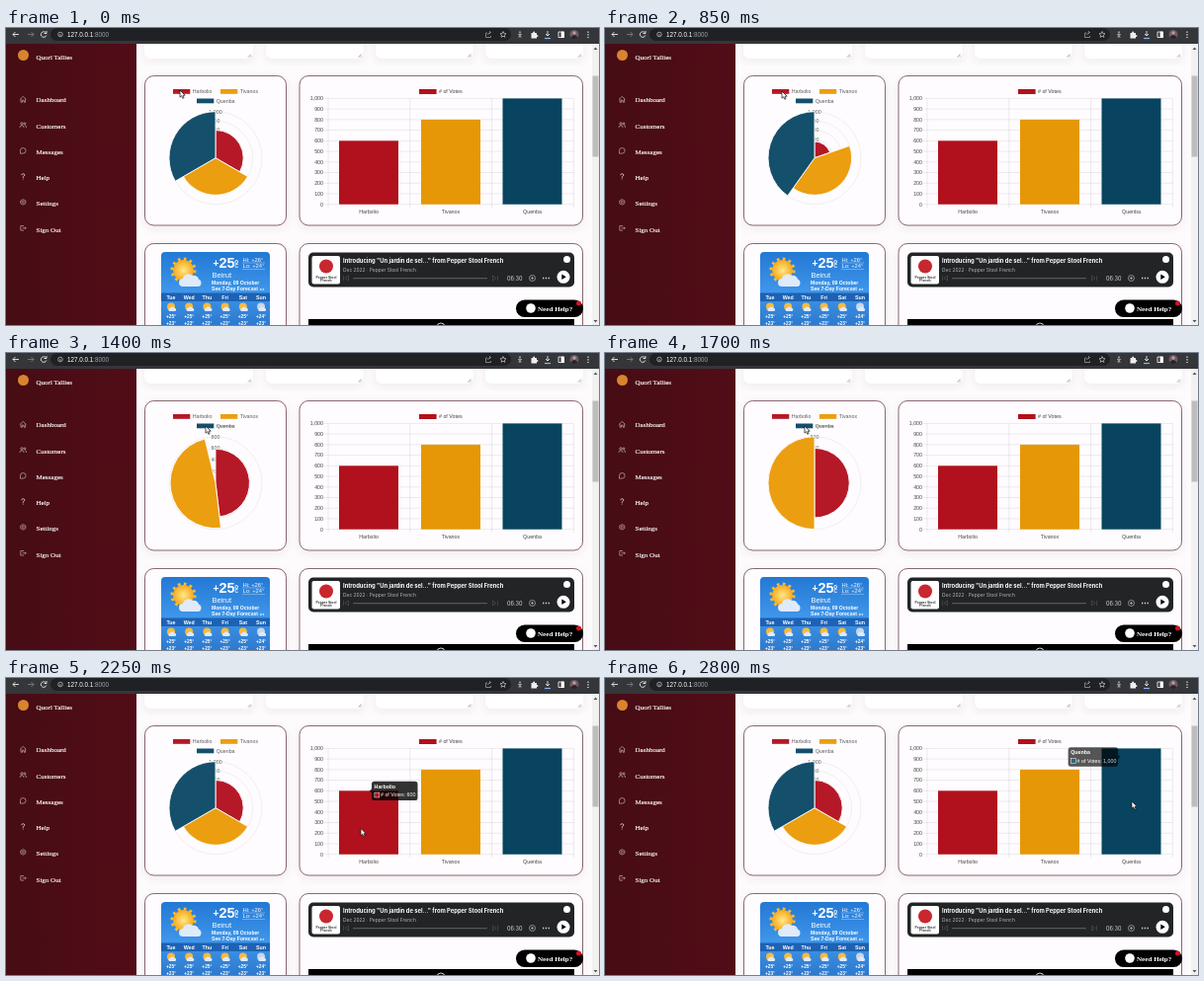
These frames come from a looping animation (600 by 301 pixels, 2.85 s). An HTML page:

```html
<!DOCTYPE html>
<html lang="en">
<head>
<meta charset="utf-8">
<title>Dashboard</title>
<style>
  html, body { margin: 0; width: 100%; height: 100%; overflow: hidden; background: #fdfbfc; }
  svg { display: block; width: 600px; height: 301px; font: 5.3px "Liberation Sans", Arial, sans-serif; }
  .serif { font-family: "Liberation Serif", "Times New Roman", serif; }
  .inter { font-family: Inter, sans-serif; }
  .label { fill: #5c5c5c; }
  #bars .label { fill: #444; }
  .mid { text-anchor: middle; }
  .end { text-anchor: end; }
  .bold { font-weight: 700; }
  .line { fill: none; stroke: #fff; stroke-width: .8; }
  .thin { stroke: #e6d8da; stroke-width: .55; }
  .dim { stroke: #5c5e60; }
  .card { fill: #fefcfe; stroke: #5a2a34; stroke-width: .7; filter: url(#shadow); }
</style>
</head>
<body>
<svg viewBox="0 0 600 301">
  <defs>
    <linearGradient id="side"><stop stop-color="#460c14"/><stop offset="1" stop-color="#520d17"/></linearGradient>
    <linearGradient id="sky" x2="0" y2="1"><stop stop-color="#2378d4"/><stop offset=".5" stop-color="#3f96ea"/><stop offset="1" stop-color="#2a74c8"/></linearGradient>
    <radialGradient id="sun"><stop stop-color="#ffe98a"/><stop offset="1" stop-color="#f7a81b"/></radialGradient>
    <filter id="shadow" x="-10%" y="-10%" width="120%" height="130%"><feDropShadow dx="0" dy="3" stdDeviation="4" flood-color="#604050" flood-opacity=".08"/></filter>
    <clipPath id="weatherClip"><rect x="157" y="227" width="110" height="90" rx="4"/></clipPath>
  </defs>
  <rect width="600" height="301" fill="#fdfbfc"/>
  <g id="cards"></g>

  <!-- browser bar -->
  <rect width="600" height="16" fill="#35363a"/>
  <rect x="45" y="0" width="466" height="13" rx="6.5" fill="#202124"/>
  <g class="line">
    <path d="M13 6.500H7m2.500-2.500L7 6.500 9.500 9"/>
    <path d="M22 6.500h6m-2.500-2.500L28 6.500 25.500 9" stroke="#85868a"/>
    <path d="M40.500 5a2.800 2.800 0 1 0 .3 2.500M41 3v2.500h-2.500"/>
    <circle cx="55" cy="6.500" r="2.300" stroke="#bbb"/><path d="M55 6v2" stroke="#bbb"/>
    <path d="M487 5h-1.500v4.500h5V8M487.500 7q.5-2.500 3-2.500m-1.500-1.500 1.500 1.500L489 6" stroke="#999"/>
    <path d="m503 3.500.9 2 2.100.2-1.600 1.500.5 2.100-1.900-1.100-1.900 1.100.5-2.100L500 5.700l2.100-.2z" stroke="#bbb"/>
    <path d="M548 3v5m-2-2 2 2 2-2"/><path d="M545 10.500h6" stroke="#8ab4f8" stroke-width="1.200"/>
    <path d="M559 4h5.500v5.500H559z"/><path d="M562 4h2.500v5.500H562z" fill="#fff"/>
  </g>
  <path d="M518.300 9.500h3.400l-.9-2.500h1.200V6h-4v1h1.200zM518.800 3.500h2.400l-.4 2h-1.600z" fill="#999"/>
  <path d="M531.500 5h1.600q0-2 1.600-1.500.8.5.3 1.500h2v2q1.500 0 1.500 1t-1.500 1v1.500h-5.500z" fill="#eee"/>
  <circle cx="575" cy="6.500" r="4.500" fill="#6d5c66"/><path d="M571.500 9.500q3.500-5 7 0-3.500 3-7 0" fill="#28232b"/><circle cx="575" cy="5" r="1.700" fill="#c39a91"/>
  <path d="M589 3.500v7" stroke="#fff" stroke-width="1.200" stroke-dasharray="1.200 1.500"/>
  <text x="62" y="8.800" fill="#fff" font-size="6.300">127.0.0.1<tspan fill="#9aa0a6">:8000</tspan></text>

  <!-- sidebar -->
  <rect y="16" width="132" height="285" fill="url(#side)"/>
  <circle cx="17.500" cy="27.500" r="5.500" fill="#d8842f"/>
  <g id="menu" class="serif" font-size="7" fill="#fff" stroke="#fff" stroke-width=".15"><text x="30.500" y="31.500">Quorl Tallies</text></g>
  <g class="line thin" transform="translate(0 -.8)">
    <path d="M14.300 73l3-2.800 3 2.800M15 72.500V76h1.500v-2h1.600v2h1.500v-3.500"/>
    <circle cx="16" cy="97.700" r="1.200"/><circle cx="19" cy="97.700" r="1"/><path d="M13.900 101.700q.3-2.200 2.100-2.200t2.100 2.200M19 99.500q1.600.2 1.700 2.200"/>
    <path d="M14.500 128v-3a2.800 2.800 0 1 1 2.800 2.900z"/>
    <path d="M15.800 150q0-1.500 1.500-1.500t1.500 1.400q0 1-1.500 1.700v1.100m0 .8v.8" stroke-width=".8"/>
    <path d="M17.300 174.500l2.500 1.300v2.800l-2.500 1.300-2.500-1.300v-2.800z"/><circle cx="17.300" cy="177.200" r="1"/>
    <path d="M18 201.300h-3.200v4.600H18m-1.500-2.300h3.700m-1.200-1.300 1.300 1.300-1.300 1.300"/>
  </g>

  <!-- scrollbar -->
  <rect x="593" y="16" width="7" height="285" fill="#f1f1f1"/>
  <rect x="593.500" y="48.500" width="6" height="82" fill="#bdbdbd"/>
  <path d="M594.500 22l2-2.500 2 2.500z" fill="#555"/><path d="M594.500 296l2 2.500 2-2.500z" fill="#555"/>

  <g id="bars"></g>

  <!-- weather -->
  <g clip-path="url(#weatherClip)" fill="#fff">
    <rect x="157" y="227" width="110" height="80" fill="url(#sky)"/>
    <rect x="157" y="268.500" width="110" height="8.500" fill="#1d62b4"/>
    <circle cx="179.500" cy="245.500" r="11" fill="none" stroke="#f9bd35" stroke-width="4" stroke-dasharray="2.500 3.260"/>
    <circle cx="179.500" cy="245.500" r="10.500" fill="url(#sun)"/>
    <path d="M179 262a4 4 0 0 1 0-8 6 6 0 0 1 10-3 5 5 0 0 1 6 3.500 4 4 0 0 1 0 7.500z" fill="#dfeafa"/>
    <g class="bold"><text x="209.500" y="242" font-size="10">+</text><text x="215.500" y="243" font-size="14.500">25</text>
    <text x="231" y="243" font-size="11">°</text><text x="231.500" y="243.300" font-size="5">C</text></g>
    <text x="239.500" y="236.500" font-size="5.800">Hi: +26°</text><text x="239.500" y="243.300" font-size="5.800">Lo: +24°</text>
    <path d="M239 238h23m-23 6.500h23" stroke="#cfe4fa" stroke-width=".4"/>
    <text x="208.500" y="253" font-size="7.500">Beirut</text>
    <g class="bold" font-size="5.100"><text x="208" y="260">Monday, 09 October</text>
    <text x="208" y="265.700">See 7-Day Forecast ›››</text></g>
    <g id="days"></g>
  </g>

  <!-- podcast player -->
  <rect x="306" y="227.500" width="269" height="35" rx="5" fill="#222426"/>
  <rect x="309.500" y="231" width="28.500" height="28.500" rx="2" fill="#fff"/>
  <circle cx="324" cy="241.500" r="7" fill="#c8272f"/>
  <g class="mid bold" font-size="3.400" fill="#333"><text x="324" y="253.500">Pepper Stool</text><text x="324" y="257">French</text></g>
  <g class="inter" fill="#fff">
    <text class="bold" x="341" y="238" font-size="5.800">Introducing "Un jardin de sel..." from Pepper Stool French</text>
    <text x="341" y="246.500" font-size="4.900" fill="#b8b8b9">Dec 2022 · Pepper Stool French</text>
    <text x="507" y="255.700" font-size="5.600" fill="#d5d6d7">06:30</text>
  </g>
  <rect x="351" y="253" width="136" height="1.300" rx=".6" fill="#55575a"/>
  <g class="line dim"><path d="M341.500 251v5m5-5-3.500 2.500 3.500 2.500zM497.500 251v5m-5-5 3.500 2.500-3.500 2.500z" stroke-width=".5"/>
  <circle cx="532.500" cy="253.500" r="3" stroke="#aaa"/><path d="M531 253.500h3m-1.500-1.500v3" stroke="#aaa"/></g>
  <path d="M543 253.500h7" stroke="#ddd" stroke-width="1.300" stroke-dasharray="1.300 1.500"/>
  <circle cx="567.500" cy="234.500" r="3.500" fill="#fff"/>
  <circle cx="564" cy="252.300" r="6.500" fill="#fff"/><path d="M562.300 249.500v5.600l4.500-2.800z"/>
  <rect x="306" y="295" width="269" height="6"/>
  <circle cx="440" cy="303" r="4" class="line"/>

  <!-- help button -->
  <rect x="516" y="275.500" width="68" height="17.500" rx="8.750"/>
  <circle cx="531" cy="284" r="4.800" fill="#fff"/>
  <text class="serif bold" x="538" y="286.700" font-size="7.100" fill="#fff">Need Help?</text>
  <circle cx="579.500" cy="279" r="2.500" fill="#d5141f"/>

  <g id="live"></g>
  <g id="tip"></g>
  <path id="cursor" d="M0 0v7.200l1.700-1.500 1.100 2.600 1.300-.6-1.100-2.500h2.200z" fill="#fff" stroke="#111" stroke-width=".7"/>
</svg>
<script>
const $ = id => document.getElementById(id);
const rect = (x, y, w, h, extra) => `<rect x="${x}" y="${y}" width="${w}" height="${h}" ${extra}/>`;
const text = (x, y, s, extra = 'class="label"') => `<text x="${x}" y="${y}" ${extra}>${s}</text>`;
const clamp = x => Math.min(1, Math.max(0, x));
const mix = (a, b, p) => a + (b - a) * p;
const easeOut = x => 1 - (1 - clamp(x)) ** 4;

const names = ['Harbolio', 'Tivanox', 'Quenba'];
const votes = [600, 800, 1000];
const barColors = ['#b1111c', '#e59706', '#08445f'];
const pieColors = ['#b51827', '#eb9e10', '#144f6b'];
const barX = [367, 450, 532.5], floor = 178.7;
const barY = v => floor - v * .1073;
const comma = n => n.toLocaleString('en-US');

function drawStatic() {
  $('cards').innerHTML =
    [[140, 110], [263, 98.5], [374, 98.5], [485, 99]].map(([x, w]) =>
      rect(x, 0, w, 31, 'rx="7" fill="#fff" filter="url(#shadow)"') +
      `<path d="M${x + w - 5} 29.500l3-3m-1.300 3 1.300-1.300" stroke="#777" stroke-width=".6"/>`).join('') +
    [48.5, 218.5].map(y => [[140.5, 143], [297, 286.5]].map(([x, w]) =>
      rect(x, y, w, 151.5, 'rx="9" class="card"')).join('')).join('');

  $('menu').innerHTML += ['Dashboard', 'Customers', 'Messages', 'Help', 'Settings', 'Sign Out']
    .map((s, i) => text(30.5, 75.2 + i * 26.3, s, '')).join('');

  let s = '', grid = '';
  for (let v = 0; v <= 1000; v += 100) {
    grid += `M321.500 ${barY(v)}H574.500`;
    s += text(321, barY(v) + 1.9, comma(v), 'class="label end"');
  }
  for (let i = 0; i < 4; i++) grid += `M${326 + i * 82.8} 71.400V182`;
  s += `<path d="${grid}" stroke="#000" stroke-opacity=".13" stroke-width=".6"/>`;
  votes.forEach((v, i) => {
    s += rect(barX[i] - 30, barY(v), 60, floor - barY(v), `fill="${barColors[i]}"`) +
      text(barX[i], 188.3, names[i], 'class="label mid"');
  });
  $('bars').innerHTML = s + rect(418, 62, 17.6, 5, `fill="${barColors[0]}"`) + text(438, 66.2, '# of Votes');

  $('days').innerHTML = ['Tue', 'Wed', 'Thu', 'Fri', 'Sat', 'Sun'].map((d, i) => {
    const x = 167 + i * 18.2, mid = 'class="mid bold"';
    return text(x, 274.7, d, mid) + `<circle cx="${x}" cy="282.500" r="4" fill="${i < 5 ? '#f9b93c' : '#c8d6e6'}"/>` +
      `<path d="M${x - 1} 287a1.600 1.600 0 0 1 0-3.200 2.500 2.500 0 0 1 4.500 0 1.600 1.600 0 0 1 0 3.200z" fill="#dfeafa"/>` +
      text(x, 294.3, i < 5 ? '+25°' : '+24°', mid + ' font-size="4.800"') + text(x, 300.7, '+23°', mid + ' font-size="4.800"');
  }).join('');
}

// Times at which a slice is switched off and on again.
const redOff = 150, redOn = 750, blueOff = 1190, blueOn = 1727;
const hidden = (t, off, on) => t < on ? easeOut((t - off) / 500) : 1 - easeOut((t - on) / 500);

function drawPie(t) {
  const cx = 212, cy = 131.7, R = 47;
  const off = [t >= redOff && t < redOn, false, t >= blueOff && t < blueOn];
  const u = hidden(t, redOff, redOn), v = hidden(t, blueOff, blueOn);
  const scale = R / 1000 * (1 + v / 4);
  const angles = [120 * (1 - u) + 60 * v, 120 + 60 * (u + v), 120 * (1 - v) + 60 * u];
  const radii = [600 * scale * (1 - u), 800 * scale, R * (1 - v)];
  const max = off[2] ? 800 : 1000;
  let s = '', labels = '', angle = 0;
  for (let k = 200; k <= max; k += 200) {
    const r = R * k / max;
    s += `<circle cx="${cx}" cy="${cy}" r="${r}" fill="none" stroke="#000" stroke-opacity=".12" stroke-width=".5"/>`;
    labels += rect(cx - (k > 999 ? 7.5 : 5.2), cy - r - 3.5, k > 999 ? 15 : 10.4, 7, 'fill="#fff" fill-opacity=".75"') +
      text(cx, cy - r + 1.9, comma(k), 'class="label mid"');
  }
  s += labels;
  angles.forEach((a, i) => {
    const point = deg => {
      const q = deg * Math.PI / 180;
      return `${cx + radii[i] * Math.sin(q)} ${cy - radii[i] * Math.cos(q)}`;
    };
    if (!off[i] && a > .1) s += `<path d="M${cx} ${cy}L${point(angle)}A${radii[i]} ${radii[i]} 0 ${+(a > 180)} 1 ${point(angle + a)}z"
      fill="${pieColors[i]}" stroke="#fff" stroke-width=".9"/>`;
    angle += a;
  });
  [[169, 62], [217, 62], [193, 71.5]].forEach(([x, y], i) => {
    s += rect(x, y, 17.3, 4.8, `fill="${pieColors[i]}"`) +
      text(x + 19.7, y + 4.2, names[i], `class="label" ${off[i] ? 'text-decoration="line-through"' : ''}`);
  });
  $('live').innerHTML = s;
}

const hovers = [[2150, 2445], [2475, 2700], [2759, 2850]];
const tipSpots = [[370, 114.4], [453, 92.9], [479, 71.4]];

function drawTip(t) {
  let alpha = 0, i = -1;
  hovers.forEach(([from, to], k) => {
    if (t < from) return;
    i = k;
    alpha = clamp(alpha + (Math.min(t, to) - from) / 100);
    const next = hovers[k + 1] ? hovers[k + 1][0] : to;
    if (t > to) alpha = clamp(alpha - (Math.min(t, next) - to) / 100);
  });
  if (i < 0) return $('tip').innerHTML = '';
  const p = easeOut((t - hovers[i][0]) / 200), before = tipSpots[Math.max(0, i - 1)];
  const x = mix(before[0], tipSpots[i][0], p), y = mix(before[1], tipSpots[i][1], p);
  const w = i < 2 ? 46.5 : 50.5;
  const caret = i < 2 ? `M${x} ${y - 2.2}l-2.200 2.200 2.200 2.200z` : `M${x + w} ${y - 2.2}l2.200 2.200-2.200 2.200z`;
  $('tip').innerHTML = `<g opacity="${alpha}" fill="#fff">` +
    rect(x, y - 9.7, w, 19.4, 'rx="2.600" fill="#000" fill-opacity=".8"') +
    `<path d="${caret}" fill="#000" fill-opacity=".8"/>` +
    text(x + 2.6, y - 2.6, names[i], 'class="bold"') +
    rect(x + 2.9, y + 1.7, 4.9, 4.9, `fill="${barColors[i]}" stroke="#fff" stroke-width=".5"`) +
    text(x + 9, y + 6, '# of Votes: ' + comma(votes[i]), '') + '</g>';
}

const path = [[0, 176, 63], [700, 176, 63], [850, 179, 64], [1000, 184, 66], [1150, 202, 74], [1730, 202, 74],
  [1950, 250, 99], [2150, 338, 144], [2250, 359, 152.5], [2400, 372, 150], [2475, 420, 142], [2600, 452, 136],
  [2700, 480, 132], [2759, 503, 129], [2800, 533, 125], [2850, 533, 125]];

function drawCursor(t) {
  const k = path.findIndex(q => q[0] > t), [a, b] = [path[k - 1], path[k]];
  const p = (t - a[0]) / (b[0] - a[0]);
  $('cursor').setAttribute('transform', `translate(${mix(a[1], b[1], p)} ${mix(a[2], b[2], p)})`);
}

let shown = -1;
function frame() {
  const t = Math.floor(performance.now() % 2850 / 50) * 50;
  if (t !== shown) {
    shown = t;
    drawPie(t);
    drawTip(t);
    drawCursor(t);
  }
  requestAnimationFrame(frame);
}
drawStatic();
frame();
</script>
</body>
</html>
```
